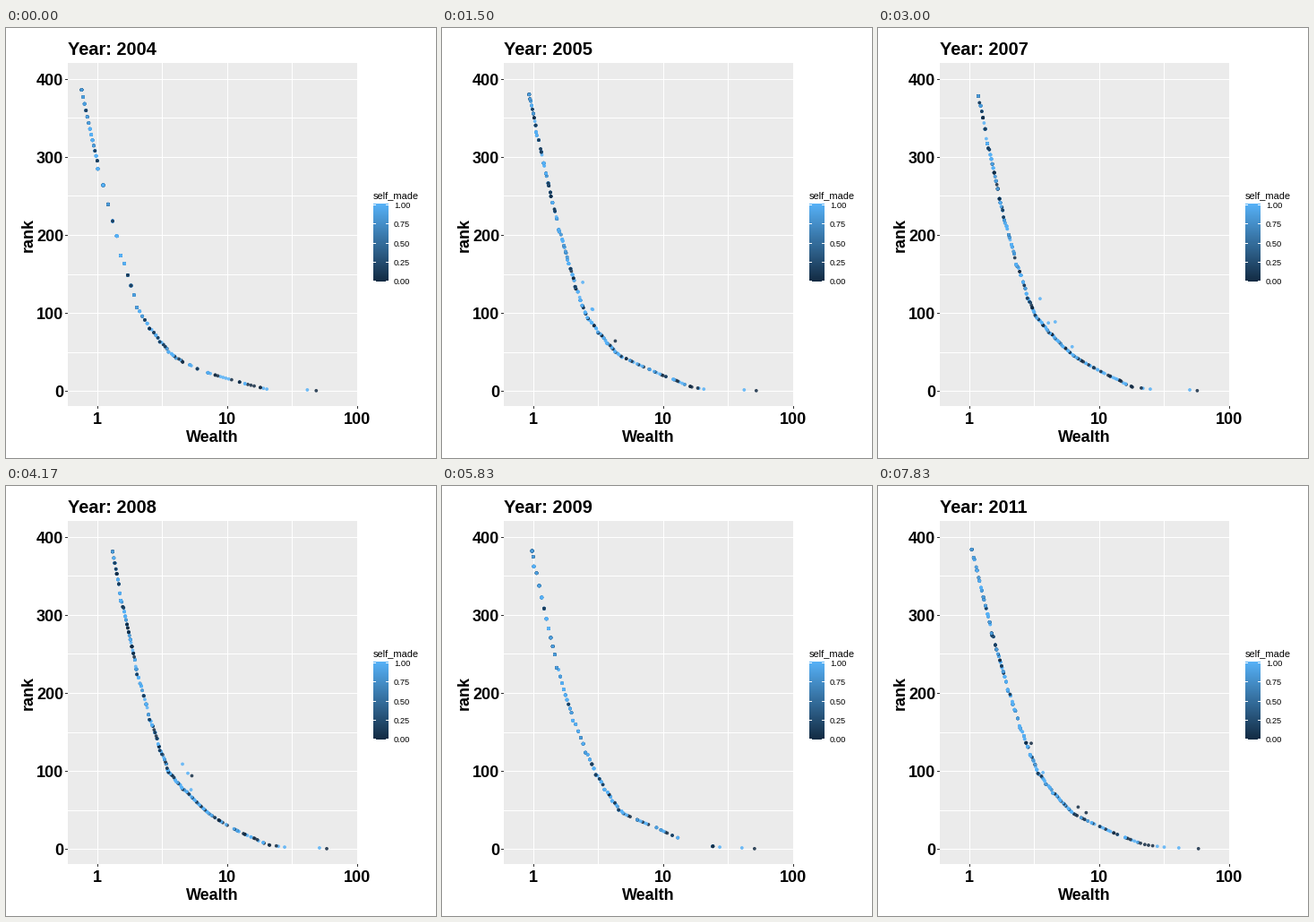
A matplotlib script for the animation above (8000 ms loop, 480 px wide and 480 px high).

```python
import numpy as np
import matplotlib.pyplot as plt
from matplotlib.animation import FuncAnimation
from matplotlib.patches import Rectangle

SIZE, DPI = 480, 100
PX = 72 / DPI                        # points per pixel
TICK, LOOP = 40, 8000                # ms
STEPS, PER_YEAR, FIRST = 48, 7, 2004
PEOPLE = 400
DARK, LIGHT = np.array([19, 43, 67]) / 255, np.array([86, 177, 247]) / 255
rng = np.random.default_rng(12)

# worth at a few key ranks, one row per year
KEY_RANKS = (1, 2, 3, 6, 14, 28, 46, 100, 200, 390)
KEY_WORTH = (
    (48, 41, 20, 17, 11.3, 6.0, 3.85, 2.15, 1.41, .75),
    (51, 40, 20.3, 16, 12.5, 7.6, 4.35, 2.42, 1.58, .88),
    (53, 46, 20.5, 16.5, 12.6, 8.5, 5.4, 2.8, 1.8, 1.0),
    (59, 52, 28, 18, 15.8, 10.5, 7.0, 3.5, 2.2, 1.28),
    (57, 50, 27, 22.3, 16.5, 10.8, 7.3, 3.63, 2.29, 1.29),
    (50, 40, 27, 19.4, 13.3, 8.8, 4.9, 3.0, 1.75, .96),
    (54, 45, 27, 20.5, 14.2, 9.5, 5.7, 3.1, 1.93, 1.0),
    (59, 39, 33.3, 23.5, 17.5, 10.9, 6.5, 3.5, 2.1, 1.05),
)


def px_x(log_w):
    return 102 + 145 * log_w


def px_y(rank):
    return 405.2 - 0.871 * rank


def standings(k):
    """Dot positions of every row in year k; equal worth shares one rank."""
    root, logs = np.sqrt(KEY_RANKS), np.log10(KEY_WORTH[k])

    def rank_of(w):
        return np.interp(-np.log10(w), -logs, root) ** 2

    # published worths are rounded, and round halves attract more people
    fine = 0.1 if k == 0 else 0.05
    low = np.r_[np.arange(0.75, 1, 0.02), np.arange(1, 1.99, fine),
                np.arange(2, 4.55, 0.1)].round(2)
    low = low[low >= KEY_WORTH[k][-1]]
    pull = np.where(np.isclose(low * 2 % 1, 0), 0.035, 0.01)
    low_rank = rank_of(low * (1 + pull))

    # the rich end is sparse
    high_rank = np.array([r for r in range(1, int(low_rank[-1]))
                          if r < 5 or rng.random() < 0.62])
    high = 10 ** np.interp(np.sqrt(high_rank), root, logs)

    worth = np.r_[high, low[::-1]]
    rank = np.r_[high_rank, low_rank[::-1]]
    row = np.searchsorted(rank, np.arange(1, PEOPLE + 1), side="right") - 1
    return px_x(np.log10(worth[row])) + 0.5, px_y(rank[row]) + 0.5


def reorder():
    """Mostly the same order next year, with a few long jumps."""
    order = list(range(PEOPLE))
    for _ in range(4):
        a = int(rng.integers(25, 65))
        b = a + int(rng.integers(70, 150))
        if rng.random() < 0.5:
            a, b = b, a
        order.insert(a, order.pop(b))
    return order


states = [standings(k) for k in range(len(KEY_WORTH))]
targets = [reorder() for _ in states[1:]]

self_made = (rng.random(PEOPLE) > 0.3).astype(float)
self_made[0], self_made[1:4], self_made[5:9] = 0, 1, 0
shade = DARK + self_made[:, None] * (LIGHT - DARK)
rgba = np.c_[shade, np.full(PEOPLE, 0.8)]

fig = plt.figure(figsize=(SIZE / DPI, SIZE / DPI), dpi=DPI, facecolor="white")
ax = fig.add_axes([0, 0, 1, 1])
ax.axis("off")


def text(x, y, s, size, weight="bold", **kw):
    return ax.text(x, y, s, fontsize=size * PX, weight=weight, color="black",
                   family="Liberation Sans", va="baseline", **kw)


def box(x, y, w, h, color="white", z=1):
    ax.add_patch(Rectangle((x, y), w, h, fc=color, lw=0, zorder=z))


L, R, T, B = 69, 392, 39, 422
box(L, T, R - L, B - T, "#EBEBEB", 0)
for r in range(0, 401, 50):
    y = round(px_y(r))
    box(L, y, R - L, 1)
    if r % 100 == 0:
        box(L - 3, y, 3, 1, "#333333")
        text(64.3, y + 7, str(r), 18, ha="right")
for half in range(5):
    x = int(px_x(half / 2))
    if half < 4:
        box(x, T, 1, B - T)
    if half % 2 == 0:
        box(x, B, 1, 3, "#333333")
        text(x, 442, str(10 ** (half // 2)), 18, ha="center")
text(230.5, 462, "Wealth", 18, ha="center")
text(30, 230.5, "rank", 18, ha="center", rotation=90, rotation_mode="anchor")
title = text(69, 30.5, "", 20)

# colour bar
ramp = DARK + np.linspace(1, 0, 86)[:, None] * (LIGHT - DARK)
ax.imshow(ramp[:, None, :], extent=(410, 427, 283, 196), aspect="auto",
          interpolation="nearest", zorder=0.5)
ax.set(xlim=(0, SIZE), ylim=(SIZE, 0))
text(410, 190, "self_made", 11, "normal")
for k in range(5):
    y = round(282 - 21.25 * k)
    box(410, y, 3, 1)
    box(424, y, 3, 1)
    text(433, y + 4, f"{k / 4:.2f}", 9.3, "normal")

dots = ax.scatter(np.zeros(PEOPLE), np.zeros(PEOPLE), s=(2.8 * PX) ** 2,
                  lw=0.95 * PX, fc=rgba, ec=rgba, zorder=3)


def draw(n):
    # the picture holds for a 48th of the loop at a time
    step = min(int((n * TICK + TICK - 5) * STEPS / LOOP), STEPS - 1)
    k, part = divmod(step, PER_YEAR)
    f = part / PER_YEAR
    (x0, y0), (x1, y1), to = states[k], states[k + 1], targets[k]
    dots.set_offsets(np.c_[x0 + f * (x1[to] - x0), y0 + f * (y1[to] - y0)])
    title.set_text(f"Year: {round(FIRST + step / PER_YEAR)}")
    return dots, title


anim = FuncAnimation(fig, draw, frames=LOOP // TICK, interval=TICK,
                     init_func=lambda: draw(0), repeat=True, repeat_delay=0)
plt.show()
```
